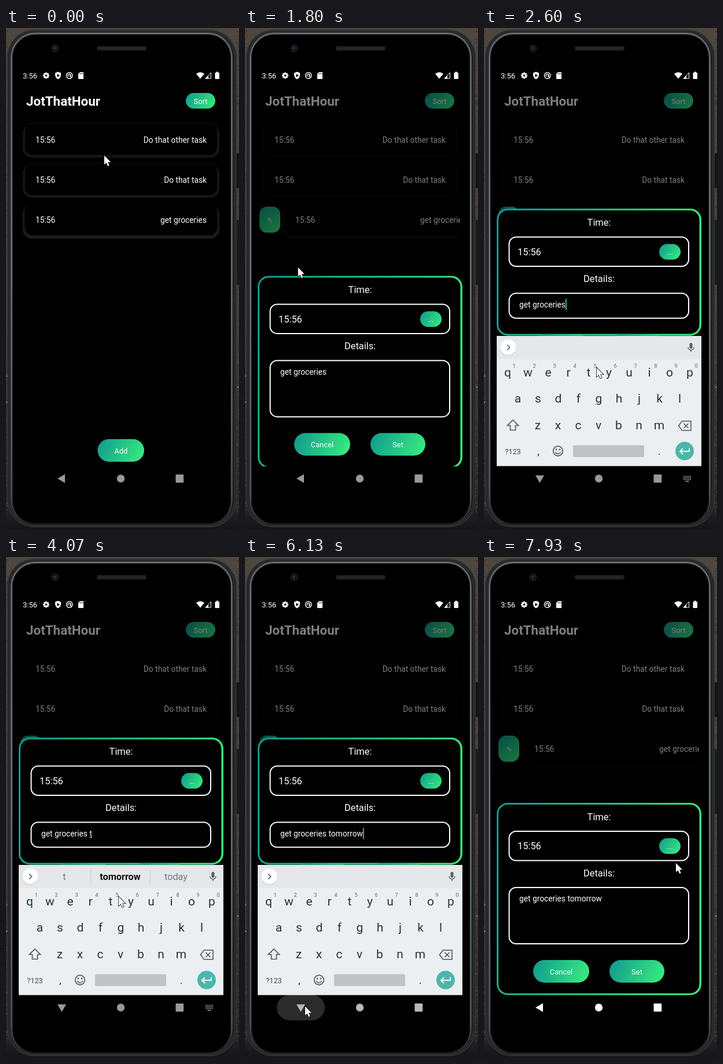
An HTML page with a canvas for the animation above (8000 ms loop, 403 px wide and 864 px high).

```html
<!DOCTYPE html>
<html lang="en">
<head>
<meta charset="utf-8">
<title>Task list</title>
<style>
  html, body { margin: 0; width: 100%; height: 100%; overflow: hidden; background: #000; }
  canvas { display: block; width: 403px; height: 864px; }
</style>
</head>
<body>
<canvas id="stage"></canvas>
<script>
const W = 403, H = 864, LOOP = 8000, STEP = 200 / 3;
const TEAL = '#11998e', GREEN = '#38ef7d', WHITE = '#fff', INK = '#263238';
const canvas = document.getElementById('stage');
const ctx = canvas.getContext('2d');
const ratio = window.devicePixelRatio || 1;
canvas.width = W * ratio;
canvas.height = H * ratio;

const clamp = v => Math.max(0, Math.min(1, v));
const mix = (a, b, k) => a + (b - a) * k;
const smooth = k => k * k * (3 - 2 * k);
const easeOut = k => 1 - (1 - k) ** 3;
const ramp = (s, from, to) => clamp((s - from) / (to - from));

function rounded(x, y, w, h, r) {
  ctx.beginPath();
  ctx.roundRect(x, y, w, h, r);
}
function box(x, y, w, h, r, fill) {
  rounded(x, y, w, h, r);
  ctx.fillStyle = fill;
  ctx.fill();
}
function outline(x, y, w, h, r, color, width) {
  rounded(x, y, w, h, r);
  ctx.strokeStyle = color;
  ctx.lineWidth = width;
  ctx.stroke();
}
function disc(x, y, r, fill) {
  ctx.beginPath();
  ctx.arc(x, y, r, 0, Math.PI * 2);
  ctx.fillStyle = fill;
  ctx.fill();
}
function ring(x, y, r, color, width, from = 0, to = Math.PI * 2) {
  ctx.beginPath();
  ctx.arc(x, y, r, from, to);
  ctx.strokeStyle = color;
  ctx.lineWidth = width;
  ctx.stroke();
}
function poly(points, fill) {
  ctx.beginPath();
  points.forEach(([x, y]) => ctx.lineTo(x, y));
  ctx.closePath();
  ctx.fillStyle = fill;
  ctx.fill();
}
function line(points, color, width, closed) {
  ctx.beginPath();
  points.forEach(([x, y]) => ctx.lineTo(x, y));
  if (closed) ctx.closePath();
  ctx.strokeStyle = color;
  ctx.lineWidth = width;
  ctx.stroke();
}
// y is the middle of the capitals
function text(str, x, y, size, color = WHITE, align = 'left', weight = 400) {
  ctx.font = `${weight} ${size}px Roboto, sans-serif`;
  ctx.textAlign = align;
  ctx.fillStyle = color;
  ctx.fillText(str, x, Math.round(y + size * 0.355));
}
function clipped(x, y, w, h, draw) {
  ctx.save();
  ctx.beginPath();
  ctx.rect(x, y, w, h);
  ctx.clip();
  draw();
  ctx.restore();
}
function gradient(x, y, w, h) {
  const g = ctx.createLinearGradient(x, y, x + w, y + h);
  g.addColorStop(0, TEAL);
  g.addColorStop(1, GREEN);
  return g;
}
function pill(x, y, w, h, label) {
  box(x, y, w, h, h / 2, gradient(x, y, w, h));
  text(label, x + w / 2, y + h / 2 + 0.5, 13, '#f4fffa', 'center');
}

function phone() {
  const wall = ctx.createLinearGradient(0, 0, 0, H);
  wall.addColorStop(0, '#4f4640');
  wall.addColorStop(0.6, '#463d39');
  wall.addColorStop(0.95, '#2a2628');
  wall.addColorStop(1, '#15141a');
  ctx.fillStyle = wall;
  ctx.fillRect(0, 0, W, H);
  let seed = 7;
  const rand = () => (seed = seed * 16807 % 2147483647) / 2147483647;
  for (let i = 0; i < 700; i++) {
    const edge = rand() * 6;
    const x = i % 2 ? edge : W - edge;
    ctx.fillStyle = rand() > 0.98 ? '#d8d0cc' : rand() > 0.5 ? '#5a504a' : '#332d2a';
    ctx.fillRect(x, rand() * 835, 1.5, 1.5);
  }
  box(399, 216, 4, 60, 1, '#131416');
  box(399, 331, 4, 112, 1, '#1b1c1e');
  box(2, 3, 397, 858, 47, '#131416');
  outline(3, 4, 395, 856, 46, '#3a3c3e', 1.5);
  outline(6, 6.5, 389, 851, 44, '#2a2c2e', 3);
  const rim = ctx.createLinearGradient(0, 0, 0, H);
  rim.addColorStop(0, '#66696c');
  rim.addColorStop(0.5, '#6c7074');
  rim.addColorStop(0.93, '#505356');
  rim.addColorStop(1, '#17191a');
  outline(9.5, 9.5, 381, 846, 41, rim, 2.8);
  box(11.5, 11.5, 377, 843, 39, '#000');

  disc(85, 35, 6.5, '#1b1d20');
  disc(85, 35, 4.3, '#101418');
  disc(84.5, 34.5, 2, '#2b3944');
  box(157, 31, 86, 8, 3, '#1d1d1d');
  box(159, 33.5, 82, 3, 1.5, '#292929');
}

function statusBar() {
  text('3:56', 29, 82, 13);
  for (let i = 0; i < 8; i++) {
    const a = i * Math.PI / 4;
    line([[69.5, 82], [69.5 + 5.6 * Math.cos(a), 82 + 5.6 * Math.sin(a)]], WHITE, 2.4);
  }
  disc(69.5, 82, 4.3, WHITE);
  disc(69.5, 82, 1.8, '#000');
  poly([[90, 75.5], [95, 77.6], [95, 82], [93.3, 86], [90, 88.4], [86.7, 86], [85, 82], [85, 77.6]], WHITE);
  poly([[88.5, 79], [93, 82], [88.5, 85]], '#000');
  ring(109.7, 82, 5.3, WHITE, 1.4);
  ring(109.7, 82, 2.5, WHITE, 1.3, 2.4, 7);
  line([[110, 82], [113.5, 86]], WHITE, 1.3);
  poly([[128, 76], [134, 76], [134, 88], [125, 88], [125, 79]], WHITE);
  [128, 130.2, 132.3].forEach(x => line([[x, 77.5], [x, 80]], '#000', 0.9));
  ctx.beginPath();
  ctx.moveTo(336, 87.5);
  ctx.lineTo(329, 79);
  ctx.quadraticCurveTo(336, 73.5, 343, 79);
  ctx.fillStyle = WHITE;
  ctx.fill();
  line([[345, 87], [354.5, 87], [354.5, 77]], WHITE, 1, true);
  poly([[344.5, 87.5], [350, 81.8], [350, 87.5]], WHITE);
  box(361.5, 77, 7.5, 11, 1, WHITE);
  ctx.fillRect(363.5, 75.5, 3.5, 2);
}

// The soft edge fades away once the dialog covers the list.
function card(y, label, dx, glow, last) {
  const grey = v => `rgba(${v},${v},${v},${glow})`;
  box(29 + dx, y + 1, 340, last ? 59 : 57.5, 16, grey(last ? 26 : 21));
  box(32 + dx, y - 1, 334, 54, 14, grey(last ? 8 : 20));
  box(33 + dx, y, 332, 54, 13, '#000');
  text('15:56', 51 + dx, y + 28, 13.78);
  text(label, 347 + dx, y + 28, 13.78, WHITE, 'right');
}

function taskList(s) {
  const glow = 1 - 0.75 * ramp(s, 23, 28);
  text('JotThatHour', 35, 126.2, 22.4, WHITE, 'left', 700);
  pill(311, 112, 51, 27, 'Sort');
  card(165, 'Do that other task', 0, glow);
  card(234.3, 'Do that task', 0, glow);
  const open = smooth(ramp(s, 9, 13));
  clipped(25, 295, 347, 75, () => {
    card(303.5, 'get groceries', 36 * open, glow, true);
    if (!open) return;
    const x = 25 - 37 * (1 - open);
    box(x, 308, 36, 45, 13, gradient(x, 308, 36, 45));
    ctx.font = '12px "DejaVu Sans", sans-serif';
    ctx.textAlign = 'center';
    ctx.fillStyle = '#c9f7dd';
    ctx.fillText('✎', x + 18.5, 335.5);
  });
  pill(158.5, 709, 80.5, 39, 'Add');
}

function details(s) {
  if (s < 48) return 'get groceries';
  if (s < 53) return 'get groceries ';
  return s < 76 ? 'get groceries t' : 'get groceries tomorrow';
}
function caretOn(s) {
  return (s >= 35 && s < 43) || (s >= 48 && s < 61) || (s >= 68.5 && s < 83.5) || (s >= 91 && s < 94);
}

function dialog(s) {
  const rise = easeOut(ramp(s, 22.2, 28));
  if (!rise) return;
  const slide = (1 - rise) * 664;
  const small = s >= 37 && s < 94;
  const top = (small ? 311.5 : 424) + slide;
  const height = small ? 219 : 331.5;
  clipped(22, 92, 354, 664, () => {
    ctx.fillStyle = 'rgba(0,0,0,0.5)';
    ctx.fillRect(22, 92 + slide, 354, 664);
    box(22, top, 354, height, 19, gradient(22, top, 354, height * 0.4));
    box(25, top + 3, 347.5, height - 6, 16, '#000');
    text('Time:', 199, top + 24, 16.4, WHITE, 'center');
    outline(43.5, top + 49, 310.5, 50.5, 12, WHITE, 2);
    text('15:56', 58, top + 74.5, 16.4);
    pill(303, top + 61, 37, 27, '...');
    text('Details:', 199, top + 121, 16.4, WHITE, 'center');
    outline(43.5, top + 146, 310.5, small ? 43 : 97, 12, WHITE, 2);

    const str = details(s), y = top + 165.5;
    text(str, 61, y, 13.78);
    const end = 61 + ctx.measureText(str).width;
    if (s >= 53 && s < 76) {
      ctx.fillStyle = WHITE;
      ctx.fillRect(144.5, y + 6, 4.5, 1);
    }
    if (caretOn(s)) {
      ctx.fillStyle = '#4db6ac';
      ctx.fillRect(end, y - 10, 1.8, 19);
    }
    const by = top + (small ? 216.5 : 271);
    clipped(22, top, 354, height, () => {
      pill(85, by, 97, 39, 'Cancel');
      pill(217, by, 95, 39, 'Set');
    });
  });
}

function suggestions(s) {
  if (s < 39 || (s >= 48 && s < 53)) return ['tomorrow', 'and', 'tomrrow'];
  return s >= 53 && s < 76 ? ['t', 'tomorrow', 'today'] : null;
}

function keyRow(letters, x, y) {
  [...letters].forEach((c, i) => text(c, x + i * 35, y, 21, INK, 'center'));
}

function keyboard(s) {
  if (s < 35 || s >= 97) return;
  const opening = 1 - ramp(s, 35, 38);
  const closing = ramp(s, 92, 97);
  const drop = 90 * opening ** 1.7 + 100 * closing;
  if (s < 37) {
    ctx.fillStyle = '#2d2e2e';
    ctx.fillRect(22, 531, 354, 225);
  }
  ctx.save();
  rounded(22, 531, 354, 268, [0, 0, 12, 12]);
  ctx.clip();
  ctx.globalAlpha = 1 - closing;
  ctx.translate(0, drop);
  ctx.fillStyle = '#eceff1';
  ctx.fillRect(22, 531, 354, drop ? 284 : 224.5);
  ctx.fillStyle = '#e5e8ea';
  ctx.fillRect(22, 531, 354, 40);
  if (s >= 73 && s < 76) {
    ctx.fillStyle = 'rgba(0,0,0,0.06)';
    ctx.fillRect(147, 531, 103, 40);
  }
  disc(42, 551.5, 14, '#d0d3d5');
  disc(42, 550.5, 13.5, WHITE);
  line([[40, 546.5], [44.5, 551], [40, 555.5]], '#555c60', 1.7);
  const words = suggestions(s);
  if (words) {
    words.forEach((word, i) => {
      const best = i === 1 && s >= 53;
      text(word, [101, 197.5, 294][i], 551, 16.3, best ? '#111' : '#747a7e', 'center', best ? 700 : 400);
    });
    ctx.fillStyle = '#c6cacc';
    ctx.fillRect(146, 540, 1, 22);
    ctx.fillRect(249, 540, 1, 22);
  }
  box(355.5, 543, 5, 10, 2.5, '#596165');
  ring(358, 550.5, 5, '#596165', 1.4, 0, Math.PI);
  line([[358, 555], [358, 559]], '#596165', 1.4);

  keyRow('qwertyuiop', 41, 594);
  [...'1234567890'].forEach((c, i) => text(c, 52 + i * 35, 583, 9, '#60696e', 'center'));
  keyRow('asdfghjkl', 58.5, 639);
  keyRow('zxcvbnm', 93, 685);
  line([[50, 676], [59.5, 685.5], [54.5, 685.5], [54.5, 693.5], [45.5, 693.5], [45.5, 685.5], [40.5, 685.5]], '#4c565b', 1.7, true);
  line([[336.5, 686], [342.5, 678], [358, 678], [358, 694], [342.5, 694]], '#4c565b', 1.6, true);
  line([[345.5, 682], [353.5, 690]], '#4c565b', 1.6);
  line([[353.5, 682], [345.5, 690]], '#4c565b', 1.6);

  text('?123', 50, 730, 12.8, '#3f494e', 'center');
  text(',', 94, 730, 18, INK, 'center');
  ring(128, 729.5, 8.3, '#4c565b', 1.7);
  disc(125, 727, 1.4, '#4c565b');
  disc(131, 727, 1.4, '#4c565b');
  ring(128, 730, 4.4, '#4c565b', 1.5, 0.2, Math.PI - 0.2);
  box(154, 719.5, 123, 20.5, 2, '#bfc3c5');
  text('.', 303, 730, 18, INK, 'center');
  disc(347, 729.5, 16, '#4db6ac');
  line([[355, 724.5], [355, 730], [339.5, 730]], WHITE, 1.8);
  line([[344, 725], [339, 730], [344, 735]], WHITE, 1.8);
  if (opening) {
    // darkness lifts as the keys rise, more slowly over the navigation strip
    ctx.fillStyle = `rgba(0,0,0,${0.47 * opening})`;
    ctx.fillRect(22, 531, 354, 284);
    ctx.fillStyle = `rgba(0,0,0,${0.18 * opening})`;
    ctx.fillRect(22, 755.5 - drop, 354, 60);
  }
  ctx.restore();
}

function navBar(s) {
  const up = s >= 35 && s < 96;
  const press = s >= 91 ? 1 - ramp(s, 92, 96) : 0;
  if (press) box(55, 755, 83, 44, 22, `rgba(255,255,255,${0.17 * press})`);
  let level = 153;
  if (s >= 35 && s < 38) level = 216;
  if (s >= 92) level = mix(184, 255, ramp(s, 92, 96));
  const color = `rgb(${level},${level},${level})`;
  const turn = s < 60 ? ramp(s, 34.5, 38) : 1 - ramp(s, 92, 96);
  ctx.save();
  ctx.translate(96.5, 777);
  ctx.rotate(-Math.PI / 2 * (up ? turn : 0));
  poly([[-7.5, 0], [5.5, -7.5], [5.5, 7.5]], color);
  ctx.restore();
  disc(198.5, 777, 6.7, color);
  box(293.5, 770, 13.7, 14, 1, color);
  if (s >= 38 && s < 91) {
    for (let r = 0; r < 3; r++) {
      for (let c = 0; c < 5; c++) box(345 + c * 2.8, 772.5 + r * 2.7, 1.8, 1.7, 0, '#999');
    }
    box(348.5, 781, 6, 1.6, 0, '#999');
  }
}

// step, x, y
const path = [
  [0, 170, 220], [4, 165, 346], [9, 165, 346], [12, 215, 345], [16, 63, 336], [19, 44, 333],
  [24, 44, 333], [32, 195, 586], [66, 195, 586], [70, 140, 568], [74, 160, 548], [76, 160, 548],
  [83, 76, 700], [88, 104, 773], [89, 104, 775], [94, 104, 775], [99, 195, 765], [103, 277, 717],
  [104, 272, 714], [106, 272, 714], [109, 205, 655], [114, 328, 500], [116, 328, 500], [119, 332, 528]
];
function pointer(s) {
  const i = Math.max(1, path.findIndex(p => p[0] >= s));
  const [a, b] = [path[i - 1], path[i]];
  const k = smooth(ramp(s, a[0], b[0]));
  ctx.save();
  ctx.translate(mix(a[1], b[1], k), mix(a[2], b[2], k));
  const shape = [[0, 0], [0, 15.5], [3.6, 12.3], [6.2, 18], [8.6, 17], [6.1, 11.3], [11, 11.3]];
  line(shape, '#111', 1.6, true);
  poly(shape, WHITE);
  ctx.restore();
}

function frame(now) {
  const s = Math.min(119, Math.floor((now % LOOP + 4) / STEP));
  ctx.setTransform(ratio, 0, 0, ratio, 0, 0);
  phone();
  statusBar();
  taskList(s);
  dialog(s);
  keyboard(s);
  navBar(s);
  pointer(s);
}

const start = performance.now();
function tick() {
  frame(performance.now() - start);
  requestAnimationFrame(tick);
}
tick();
</script>
</body>
</html>
```
